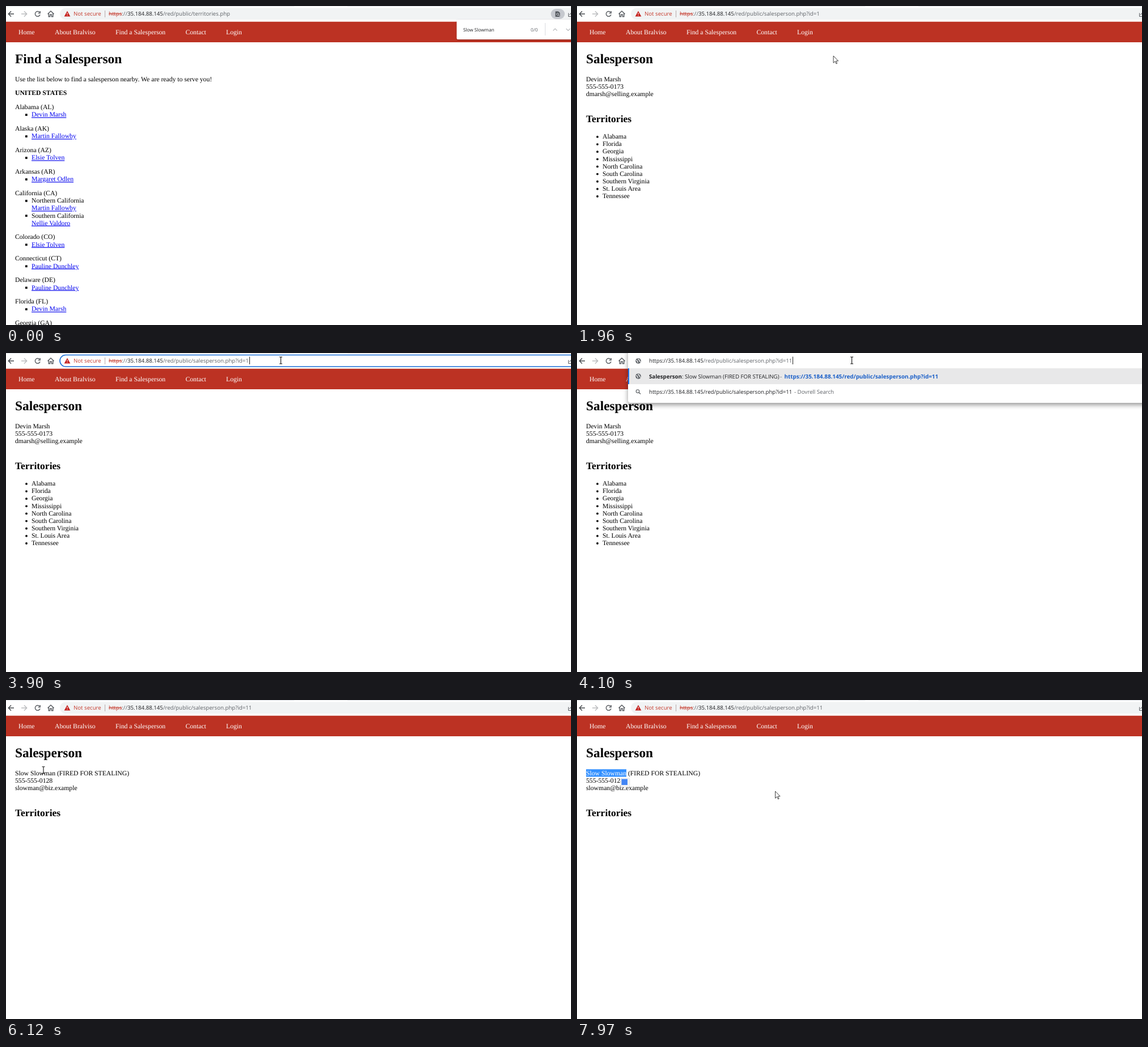
An HTML page for the animation above (8 s loop, 996 by 563 pixels).

```html
<!DOCTYPE html>
<html lang="en">
<head>
<meta charset="utf-8">
<title>Salesperson lookup</title>
<style>
  html, body { margin: 0; width: 100%; height: 100%; overflow: hidden; background: #fff; }
  svg { display: block; width: 996px; height: 563px; }
  text { font: 11.68px "Liberation Serif", serif; text-rendering: geometricPrecision; white-space: pre; }
  .h1 { font-size: 23.36px; font-weight: bold; }
  .h2 { font-size: 17.52px; font-weight: bold; }
  .link { fill: #00e; text-decoration: underline; }
  .nav, .white { fill: #fff; }
  .ui { font: 9.66px "Open Sans", "Noto Sans", sans-serif; fill: #202124; }
  .small { font-size: 8.2px; }
  .b { font-weight: bold; }
  .grey { fill: #5f6368; }
  .red { fill: #c5392b; }
  .strike { text-decoration: line-through; }
  .blue { fill: #1a5fc8; font-weight: bold; font-size: 9.85px; }
  #url.selected tspan { fill: #fff; }
  .line { fill: none; stroke: #55595e; stroke-width: 1.4; }
</style>
</head>
<body>
<svg viewBox="0 0 996 563">
  <defs>
    <filter id="lowShadow" x="-5%" y="-20%" width="110%" height="160%">
      <feDropShadow dx="0" dy=".8" stdDeviation="1.2" flood-opacity=".3"/>
    </filter>
    <filter id="highShadow" x="-5%" y="-20%" width="110%" height="160%">
      <feDropShadow dx="0" dy="3.5" stdDeviation="4" flood-opacity=".42"/>
    </filter>
    <clipPath id="selectionClip"><rect id="selection" x="16" y="122.3" width="0" height="13.2"/></clipPath>
    <g id="globe">
      <circle r="4.8" fill="#5f6368"/>
      <path d="M-3.6-1.5L-1 1V3.6M0-4.2V-2H2V0L3.8 2" fill="none" stroke="#fff" stroke-width="1.2"/>
    </g>
  </defs>

  <rect y="27" width="996" height="37" fill="#bc3223"/>
  <g id="nav"></g>
  <g id="list"></g>
  <g id="seller"></g>
  <g id="formerSeller"></g>

  <g id="marked" clip-path="url(#selectionClip)">
    <rect x="16" y="122" width="72" height="14" fill="#3390ff"/>
    <text class="white" x="16" y="132.6">Slow Slowman</text>
  </g>
  <g id="badge">
    <rect x="77" y="138" width="16" height="15.5" rx="2" fill="#f3f3f3" stroke="#ddd" stroke-width=".6"/>
    <rect x="78.5" y="139.5" width="10.5" height="10.5" fill="#4285f4"/>
  </g>

  <!-- browser toolbar -->
  <rect width="996" height="27.7" fill="#fff"/>
  <path d="M0 .5H508M602 .5H996" stroke="#dee1e6"/>
  <path d="M508 .5H602" stroke="#eceef0"/>
  <path class="line" d="M14 14H4.5M9 9.3L4.3 14L9 18.7" style="stroke:#45494d"/>
  <path class="line" d="M27 14H36.5M32 9.3L36.7 14L32 18.7" style="stroke:#babcbe"/>
  <path class="line" d="M59.2 11.2A4.4 4.4 0 1 0 60 15.2M60.2 9V12.6H56.6"/>
  <path class="line" d="M73.5 14.2L79 9L84.5 14.2M75.2 13V18.8H77.6V15.2H80.4V18.8H82.8V13"/>
  <rect id="pill" x="95" y="3.5" width="930" height="20.5" rx="10.2"/>
  <path d="M108 8.8L113.4 18.4H102.6Z" fill="#c5221f"/>
  <path d="M108 12V15M108 16V17.2" stroke="#fff"/>
  <text class="ui red" x="119" y="17.3">Not secure</text>
  <path d="M174.5 8V20" stroke="#b9a9aa"/>
  <rect id="urlSelection" x="181" y="6.5" width="248" height="14.5" fill="#0078d7"/>
  <text id="url" class="ui" x="181" y="17.3"><tspan class="red strike">https</tspan><tspan class="grey">://</tspan><tspan>35.184.88.145</tspan><tspan id="path" class="grey"></tspan></text>
  <path id="caret" d="M429.5 6.5V20" stroke="#222"/>
  <path class="line" d="M998 18.5H991.5V12.5M993.5 16Q994 12.5 998 12" style="stroke-width:1"/>

  <g id="findBar">
    <rect x="960.5" y="5" width="24.5" height="18" rx="9" fill="#c6c9cf"/>
    <path d="M968.5 9.5H973.5L976.5 12V19H968.5Z" fill="#50555b"/>
    <circle cx="972.5" cy="14.5" r="1.9" fill="none" stroke="#d5d7db"/>
    <path d="M974 16L976.5 18.5" stroke="#d5d7db"/>
    <rect x="794.5" y="24" width="220" height="35" rx="2.5" fill="#fff" filter="url(#lowShadow)"/>
    <text class="ui small" x="806" y="44.6">Slow Slowman</text>
    <text class="ui small grey" x="925" y="44.6">0/0</text>
    <path d="M950.5 30V52" stroke="#dadce0"/>
    <path class="line" d="M964.5 43.5L968 40L971.5 43.5M987.5 40L991 43.5L994.5 40" style="stroke:#b6b8bb;stroke-width:1.1"/>
  </g>

  <g id="dropdown">
    <rect x="90" y="-6" width="930" height="94" rx="5" fill="#fff" filter="url(#highShadow)"/>
    <rect x="90" y="27" width="906" height="28" fill="#e8e8e9"/>
    <rect x="90" y="27" width="2" height="28" fill="#1a73e8"/>
    <use href="#globe" x="108" y="14"/>
    <use href="#globe" x="108" y="41"/>
    <circle class="line" cx="107" cy="67.5" r="2.8" style="stroke-width:1.1"/>
    <path class="line" d="M109 69.5L112 72.5" style="stroke-width:1.2"/>
    <text class="ui" x="127" y="17.3">https://35.184.88.145<tspan class="grey">/red/public/salesperson.php?id=11</tspan></text>
    <path d="M380.5 6.5V20" stroke="#222"/>
    <text class="ui" x="127" y="44.6"><tspan class="b">Salesperson</tspan>: Slow Slowman (FIRED FOR STEALING)</text>
    <text class="ui grey" x="358" y="44.6">-</text>
    <text class="ui blue" x="365.5" y="44.6">https://35.184.88.145/red/public/salesperson.php?id=11</text>
    <text class="ui" x="127" y="72.3">https://35.184.88.145/red/public/salesperson.php?id=11</text>
    <text class="ui grey" x="383" y="72.3">- Dovrell Search</text>
  </g>

  <g id="cursor">
    <path id="arrow" d="M0 0V12.4L2.9 9.6L5 14L6.6 13.2L4.7 9H8.6Z" fill="#fff" stroke="#111" stroke-width=".8"/>
    <path id="hand" d="M-1 9V1Q-1-.5 .3-.5T1.6 1V5Q4 4.5 4.2 6Q6 5.5 6.2 7Q8 6.6 8 8.5V11Q8 13 6.5 15.5H.5Q-1.5 12.5-3.6 10Q-4.4 8.2-2.6 8Z" fill="#fff" stroke="#111" stroke-width=".8"/>
    <path id="beam" d="M-2.5-6H-.8L0-5.4L.8-6H2.5M0-5.4V5.4M-2.5 6H-.8L0 5.4L.8 6H2.5" fill="none" stroke="#111" stroke-width="1.1"/>
  </g>
</svg>

<script>
const $ = id => document.getElementById(id);
const text = (x, y, str, cls = '') => `<text class="${cls}" x="${x}" y="${y}">${str}</text>`;
const LINE = 13.14, GAP = 24.82, FIRST = 132.6;

$('nav').innerHTML = [[22, 'Home'], [86, 'About Bralviso'], [193, 'Find a Salesperson'], [316.5, 'Contact'], [388, 'Login']]
  .map(([x, label]) => text(x, 50.3, label, 'nav')).join('');

// A leading "*" gives a bullet, "_" a link
const territories = [
  ['Alabama (AL)', '*_Devin Marsh'],
  ['Alaska (AK)', '*_Martin Fallowby'],
  ['Arizona (AZ)', '*_Elsie Tolven'],
  ['Arkansas (AR)', '*_Margaret Odlen'],
  ['California (CA)', '*Northern California', '_Martin Fallowby', '*Southern California', '_Nellie Valdoro'],
  ['Colorado (CO)', '*_Elsie Tolven'],
  ['Connecticut (CT)', '*_Pauline Dunchley'],
  ['Delaware (DE)', '*_Pauline Dunchley'],
  ['Florida (FL)', '*_Devin Marsh'],
  ['Georgia (GA)']
];

function listPage() {
  let y = FIRST + GAP;
  let out = text(16, 101, 'Find a Salesperson', 'h1') +
    text(16, FIRST, 'Use the list below to find a salesperson nearby. We are ready to serve you!') +
    text(16, y, 'UNITED STATES', 'b');
  for (const [state, ...rows] of territories) {
    out += text(16, y += GAP, state);
    for (const row of rows) {
      y += LINE;
      if (row[0] === '*') out += `<rect x="34" y="${y - 5.1}" width="3.7" height="3.7"/>`;
      out += text(45, y, row.replace(/^[*_]+/, ''), row.includes('_') ? 'link' : '');
    }
  }
  return out;
}

function sellerPage(details, areas) {
  return text(16, 101, 'Salesperson', 'h1') +
    details.map((d, i) => text(16, FIRST + i * LINE, d)).join('') +
    text(16, 205, 'Territories', 'h2') +
    areas.map((area, i) => {
      const y = 234.1 + i * LINE;
      return `<circle cx="36" cy="${y - 3.2}" r="1.9"/>` + text(45, y, area);
    }).join('');
}

$('list').innerHTML = listPage();
$('seller').innerHTML = sellerPage(['Devin Marsh', '555-555-0173', 'dmarsh@selling.example'],
  ['Alabama', 'Florida', 'Georgia', 'Mississippi', 'North Carolina', 'South Carolina', 'Southern Virginia', 'St. Louis Area', 'Tennessee']);
$('formerSeller').innerHTML = sellerPage(['Slow Slowman (FIRED FOR STEALING)', '555-555-0128', 'slowman@biz.example'], []);

// Pointer moves: start, end, target x, target y
const STEP = 67;
const moves = [
  [460, 1080, 73, 191], [1270, 1960, 452, 88], [2030, 2170, 484.5, 13],
  [5640, 6120, 66, 123.7], [6190, 6400, 19, 125], [6530, 6660, 18, 132.5],
  [6800, 6870, 10, 124], [6940, 7350, 89, 127], [7550, 7970, 349.5, 161]
];
const shapes = [[0, 'arrow'], [1080, 'hand'], [1270, 'arrow'], [2170, 'beam'], [5640, 'arrow'], [6120, 'beam'], [7550, 'arrow']];
const ease = p => 1 - (1 - p ** 1.5) ** 3;

function pointerAt(t) {
  let x = 885, y = 536;
  for (const [start, end, toX, toY] of moves) {
    if (t < start) break;
    const steps = Math.round((end - start) / STEP) + 1;
    const p = t >= end ? 1 : ease(Math.min(1, (Math.floor((t - start) / STEP) + 1) / steps));
    x += (toX - x) * p;
    y += (toY - y) * p;
  }
  return [x, y];
}

const show = (id, visible) => { $(id).style.display = visible ? '' : 'none'; };

function render(t) {
  const within = (from, to) => t >= from && t < to;
  const loaded = t >= 4640;
  show('list', t < 1270);
  show('findBar', t < 1270);
  show('seller', within(1270, 4640));
  show('formerSeller', loaded);

  const page = t < 1270 ? 'territories.php' : 'salesperson.php?id=' + (t < 4500 ? '1' : '11');
  $('path').textContent = '/red/public/' + page;
  const focused = within(2440, 4500), selected = within(2440, 2840);
  $('pill').setAttribute('fill', focused ? '#fff' : '#f1f3f4');
  $('pill').setAttribute('stroke', focused ? '#1a6fd8' : 'none');
  $('pill').setAttribute('stroke-width', 1.6);
  $('url').classList.toggle('selected', selected);
  show('urlSelection', selected);
  show('caret', within(2840, 3310) || within(3900, 4030));
  show('dropdown', within(4030, 4500));

  const [x, y] = pointerAt(t);
  const shape = shapes.findLast(([start]) => t >= start)[1];
  show('cursor', t >= 460);
  $('cursor').setAttribute('transform', `translate(${x} ${y})`);
  for (const id of ['arrow', 'hand', 'beam']) show(id, id === shape);

  const marked = t < 6940 ? 0 : Math.max(0, Math.min(71, x - 16));
  $('selection').setAttribute('width', marked);
  show('badge', t >= 7550);
}

(function loop() {
  render(performance.now() % 8000);
  requestAnimationFrame(loop);
})();
</script>
</body>
</html>
```
